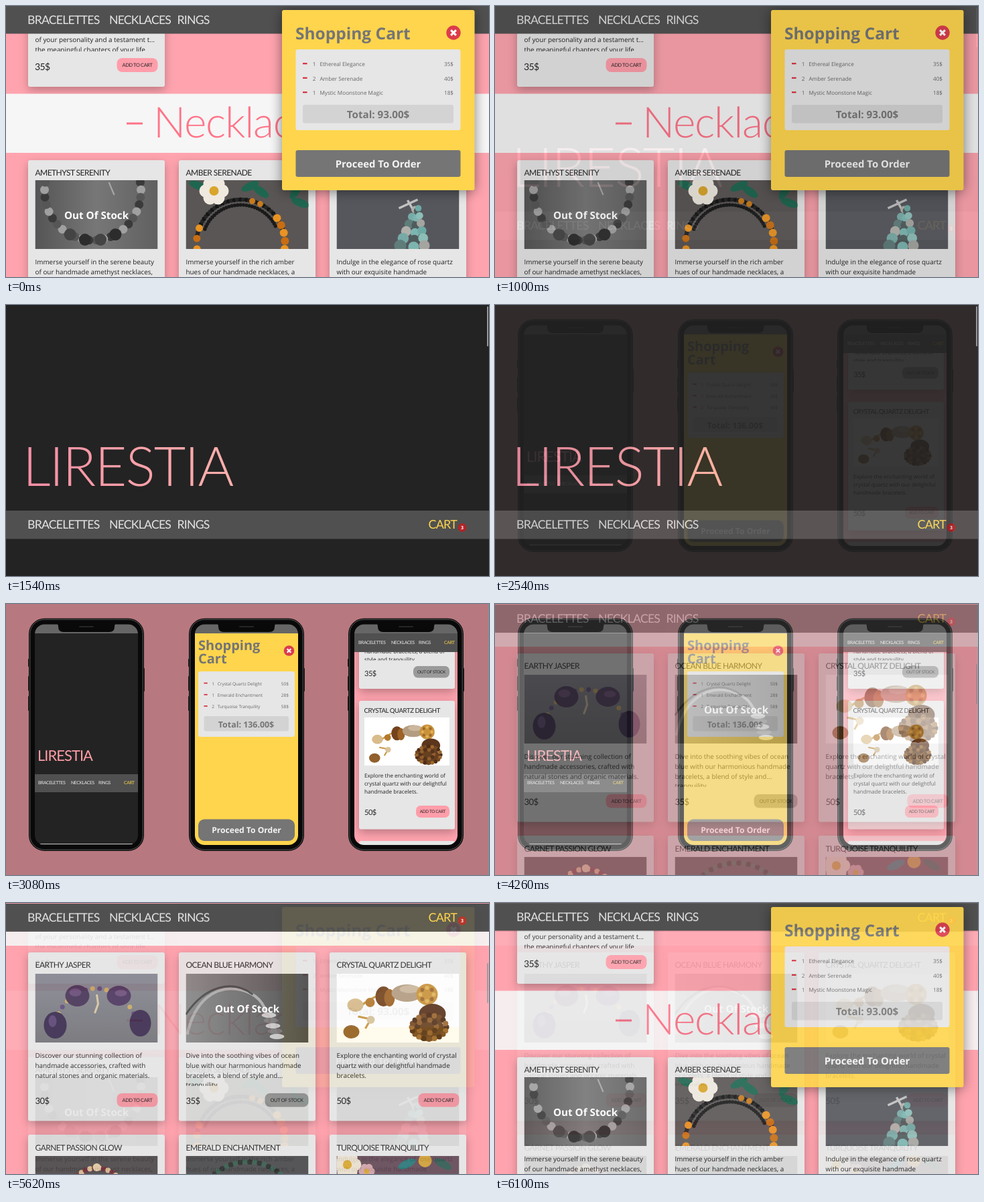
These frames come from a looping animation (721x406 px, 6.16 s). An HTML page:

```html
<!DOCTYPE html>
<html lang="en">
<head>
<meta charset="utf-8">
<title>Jewellery shop</title>
<style>
  html, body { margin: 0; width: 100%; height: 100%; overflow: hidden; }
  #stage { display: block; width: 100%; height: 100%; }
  text { font-family: "Open Sans", "Noto Sans", sans-serif; text-rendering: geometricPrecision; }
  .bold { font-weight: 700; }
  .display { font-family: Lato, sans-serif; letter-spacing: -.045em; }
  .large { font-weight: 300; letter-spacing: -.02em; }
  .card { filter: drop-shadow(0 5px 7px #0004); }
  .modal { filter: drop-shadow(0 2px 9px #0007); }

  .scene { animation: 6160ms steps(10) -4ms infinite; }
  #hero { animation-name: hero; }
  #phones { animation-name: phones; }
  #grid { animation-name: grid; }
  @keyframes hero {
    0%, 15.26% { opacity: 0 }
    25%, 80% { opacity: 1 }
    80.01%, 100% { opacity: 0 }
  }
  @keyframes phones {
    0%, 40.26% { opacity: 0 }
    50%, 80% { opacity: 1 }
    80.01%, 100% { opacity: 0 }
  }
  @keyframes grid {
    0%, 65.26% { opacity: 0 }
    75%, 90.26% { opacity: 1 }
    100% { opacity: 0 }
  }
</style>
</head>
<body>
<svg id="stage" viewBox="0 0 721 406" preserveAspectRatio="none">
  <defs>
    <linearGradient id="rose"><stop stop-color="#f78fa6"/><stop offset="1" stop-color="#ffb0ac"/></linearGradient>
    <linearGradient id="steel"><stop stop-color="#858585"/><stop offset=".55" stop-color="#636363"/><stop offset="1" stop-color="#454545"/></linearGradient>
    <linearGradient id="slate" x2="0" y2="1"><stop stop-color="#858591"/><stop offset="1" stop-color="#6f6f74"/></linearGradient>
    <linearGradient id="stone"><stop stop-color="#555"/><stop offset=".5" stop-color="#777"/><stop offset="1" stop-color="#606060"/></linearGradient>
  </defs>
  <g id="cart"></g>
  <g id="hero" class="scene"></g>
  <g id="phones" class="scene"></g>
  <g id="grid" class="scene"></g>
</svg>
<script>
const PINK = '#ffa4af', DARK = '#505050', GRAY = '#757575', PANEL = '#e6e6e6',
      YELLOW = '#fed54c', RED = '#dc3c4c', NIGHT = '#232323', INK = '#222';
const BRAND = 'LIRESTIA';

const rect = (x, y, w, h, fill, rx = 0, extra = '') =>
  `<rect x="${x}" y="${y}" width="${w}" height="${h}" rx="${rx}" fill="${fill}" ${extra}/>`;
const dot = (x, y, r, fill, ry = r) => `<ellipse cx="${x}" cy="${y}" rx="${r}" ry="${ry}" fill="${fill}"/>`;
const path = (d, stroke, width, fill = 'none') =>
  `<path d="${d}" stroke="${stroke}" stroke-width="${width}" fill="${fill}"/>`;
const text = (x, y, size, str, fill = INK, cls = '', anchor = 'start') =>
  `<text x="${x}" y="${y}" font-size="${size}" fill="${fill}" class="${cls}" text-anchor="${anchor}">${str}</text>`;
const display = (x, y, size, str, fill = INK, anchor) => text(x, y, size, str, fill, 'display', anchor);
const large = (x, y, size, str, fill) => text(x, y, size, str, fill, 'display large');
const bold = (x, y, size, str, fill = GRAY, anchor = 'middle') => text(x, y, size, str, fill, 'bold', anchor);
const lines = (x, y, size, gap, list) => list.map((s, i) => text(x, y + i * gap, size, s)).join('');
const crop = (x, y, w, h, content) =>
  `<svg x="${x}" y="${y}" width="${w}" height="${h}" viewBox="${x} ${y} ${w} ${h}">${content}</svg>`;

// Beads along an elliptic arc, angles in degrees, colours cycling
const beads = (cx, cy, rx, ry, from, to, n, r, colors) =>
  Array.from({ length: n }, (_, i) => {
    const a = (from + (to - from) * i / (n - 1)) * Math.PI / 180;
    return dot((cx + rx * Math.cos(a)).toFixed(1), (cy + ry * Math.sin(a)).toFixed(1), r, colors[i % colors.length]);
  }).join('');

// Beads along a straight line
const strand = (x0, y0, x1, y1, n, r, colors) =>
  Array.from({ length: n }, (_, i) => {
    const k = i / (n - 1);
    return dot(x0 + (x1 - x0) * k, y0 + (y1 - y0) * k, r * (.6 + .4 * k), colors[i % colors.length]);
  }).join('');

const flower = (x, y, r, petal) =>
  beads(x, y, r * .6, r * .6, 0, 300, 6, r * .5, [petal]) + dot(x, y, r * .35, '#d9a52c');
const leaf = (x, y, angle, fill = '#1f6650') =>
  `<g transform="translate(${x} ${y}) rotate(${angle})">${dot(0, 0, 14, fill, 6)}</g>`;

// Pictures live in a 183 x 103 box
const pictures = {
  amethyst: rect(0, 0, 183, 103, 'url(#stone)') +
    beads(86, 16, 72, 74, -10, 190, 24, 6.5, ['#3a3a3a', '#a0a0a0', '#565656']) +
    beads(86, 16, 72, 74, 62, 118, 4, 9, ['#2c2c2c', '#444']) + path('M110 3L118 22', '#aaa', 2),
  amber: rect(0, 0, 183, 103, '#5a5655') +
    leaf(18, 8, 20) + leaf(96, 9, -25) + leaf(112, 17, 35) + leaf(164, 16, -60) + leaf(171, 34, 20) +
    beads(82, 94, 66, 65, 190, 345, 40, 3.2, ['#151515', '#252525']) +
    beads(82, 92, 57, 55, 200, 335, 32, 2.7, ['#1a1a1a']) +
    beads(82, 94, 66, 65, 172, 200, 3, 5.5, ['#e89322', '#c76d12']) +
    beads(82, 94, 66, 65, 285, 296, 2, 4.5, ['#c87a1c']) +
    beads(82, 94, 66, 65, 325, 368, 5, 6, ['#e89322', '#c76d12']) + flower(42, 16, 20, '#efe9df'),
  quartz: rect(0, 0, 183, 103, '#56575d') +
    path('M93 42L121 29M106 30L114 44', '#c3c3c3', 3.5) +
    strand(117, 44, 95, 98, 6, 9, ['#b0b0aa', '#77aaa6', '#5f7d7a']) +
    strand(120, 46, 115, 100, 6, 8, ['#4f5c5c', '#7cb5b0']) +
    strand(122, 42, 131, 98, 6, 8, ['#6eaaa5', '#8cbdb7', '#a5a5a0']),
  jasper: rect(0, 0, 183, 103, 'url(#slate)') +
    beads(91, 95, 64, 73, 190, 350, 18, 3.5, ['#c8a661', '#5d4779']) +
    path('M92 31L94 45L89 59', '#d5c3a0', 3) +
    dot(63, 33, 18, '#453054', 16) + dot(125, 33, 18, '#49335b', 15) +
    dot(30, 77, 17, '#35264a', 20) + dot(157, 74, 16, '#38284c', 20) +
    dot(60, 28, 9, '#654874', 6) + dot(128, 29, 9, '#6a4b78', 5) + dot(26, 71, 6, '#594172', 9),
  ocean: rect(0, 0, 183, 103, 'url(#steel)') +
    path('M2 91C13 40 44 16 82 24Q116 32 122 66', '#aaa', 4) +
    path('M0 61C30 16 71 9 100 31', '#444', 3) +
    [62, 70, 78, 86, 94].map((y, i) => dot(124 + i * 3, y, 11, i % 2 ? '#777' : '#c7c7c7', 4)).join(''),
  crystal: rect(0, 0, 183, 103, '#fff') +
    path('M28 56Q45 38 65 32M32 64L51 68L43 82', '#c8953e', 3) +
    dot(28, 47, 12, '#d9bc8b', 10) + dot(50, 43, 7, '#b5792c') + dot(51, 69, 6, '#d9c39c') +
    dot(22, 87, 12, '#91602b', 10) + dot(70, 34, 12, '#74421c', 15) + dot(79, 36, 8, '#9d6225', 13) +
    dot(105, 29, 23, '#b49c80', 13) + dot(109, 23, 15, '#cbb79d', 6) + dot(135, 31, 16, '#c9923a') +
    beads(135, 31, 10, 10, 0, 315, 8, 3, ['#e0b45b', '#9c682b']) +
    dot(143, 60, 20, '#5c351d', 15) + dot(137, 83, 24, '#67401f', 18) +
    beads(138, 80, 26, 18, 0, 342, 20, 4, ['#4e2c16', '#9c6830', '#754821']) +
    beads(135, 79, 14, 10, 0, 324, 10, 4, ['#915e2c', '#54311b']),
  garnet: rect(0, 0, 183, 103, '#494346') + beads(92, 60, 42, 42, 190, 350, 18, 4, ['#6d2a35', '#d6b58c']) +
    dot(92, 17, 6, '#e1c7a0'),
  emerald: rect(0, 0, 183, 103, '#464648') + beads(92, 72, 70, 63, 190, 350, 28, 4, ['#252927', '#34594a']),
  turquoise: rect(0, 0, 183, 103, '#604653') + flower(16, 13, 19, '#eadfcd') + flower(45, 23, 11, '#d0a0a6') +
    leaf(105, 12, -25, '#247477') + leaf(159, 12, 30, '#2c5950') + dot(132, 7, 10, '#d09d34'),
};
const picture = (name, x, y, w = 183, h = 103) =>
  `<svg x="${x}" y="${y}" width="${w}" height="${h}" viewBox="0 0 183 103" preserveAspectRatio="none">${pictures[name]}</svg>`;

const card = (x, y, w, h) => rect(x, y, w, h, PANEL, 3, 'class="card"');
const button = (x, y, w, h, label, size = 7.4) =>
  rect(x, y, w, h, label === 'ADD TO CART' ? '#ff9eaa' : '#9a9a9a', h * .38) +
  display(x + w / 2, y + h / 2 + size * .36, size, label, INK, 'middle');
const soldOut = (x, y) => bold(x + 91.5, y, 15.2, 'Out Of Stock', '#fff');

const menu = y => ['BRACELETTES', 'NECKLACES', 'RINGS']
  .map((s, i) => display([32, 154, 255.5][i], y, 17.7, s, '#e4e4e4')).join('');
const cartLink = y => display(630.5, y, 18, 'CART', YELLOW) + dot(681, y - 1.5, 6.5, '#b02528') +
  bold(681, y + 1, 7, '3', '#fff');
const smallMenu = (x, y) => ['BRACELETTES', 'NECKLACES', 'RINGS', 'CART']
  .map((s, i) => display(x + [0, 49, 90, 128][i], y, 6.7, s, i === 3 ? YELLOW : '#eee')).join('');
const closeButton = (x, y, r) => {
  const d = r * .36;
  return dot(x, y, r, RED) + path(`M${x - d} ${y - d}l${2 * d} ${2 * d}m0 ${-2 * d}l${-2 * d} ${2 * d}`, '#fff', r * .28);
};
const orderRow = (x, right, y, size, [qty, name, price]) =>
  rect(x, y - size * .58, size * .8, size * .25, '#d8202f') +
  text(x + size * 1.8, y, size, qty, '#666') +
  text(x + size * 3.1, y, size, name, '#666') +
  text(right, y, size, price, '#666', '', 'end');
const scrollThumb = (y, fill) => rect(718, y, 2, 60, fill, 1);

const columns = [33, 258, 483];

function cartScene() {
  const items = [
    ['AMETHYST SERENITY', 'amethyst', ['Immerse yourself in the serene beauty', 'of our handmade amethyst necklaces,']],
    ['AMBER SERENADE', 'amber', ['Immerse yourself in the rich amber', 'hues of our handmade necklaces, a']],
    ['ROSE QUARTZ', 'quartz', ['Indulge in the elegance of rose quartz', 'with our exquisite handmade']],
  ];
  const orders = [['1', 'Ethereal Elegance', '35$'], ['2', 'Amber Serenade', '40$'], ['1', 'Mystic Moonstone Magic', '18$']];
  return rect(0, 0, 721, 406, PINK) +
    card(33, -100, 204, 221) +
    crop(33, 40, 204, 28, lines(43.5, 54, 9.9, 15, ['of your personality and a testament t...', 'the meaningful chapters of your life'])) +
    display(43, 95.5, 14, '35$') + button(165.5, 78, 61, 21, 'ADD TO CART') +
    rect(0, 131.5, 721, 88.5, '#f6f6f6') +
    rect(180, 174.5, 24, 3, '#ff7488') + large(220, 197, 64, 'Necklaces', '#ff7488') +
    items.map(([title, pic, copy], i) => {
      const x = columns[i];
      return card(x, 231, 204, 200) + display(x + 10.5, 254, 12, title) + picture(pic, x + 10.5, 261) +
        lines(x + 10.5, 387, 9.9, 15, copy);
    }).join('') + soldOut(43.5, 319) +
    rect(0, 0, 721, 41.5, DARK) + menu(26.5) +
    rect(412, 6, 287.5, 270, YELLOW, 3, 'class="modal"') +
    bold(432, 50, 24.5, 'Shopping Cart', GRAY, 'start') + closeButton(668, 40, 10.7) +
    rect(432.5, 65, 246, 121, PANEL, 3) +
    orders.map((o, i) => orderRow(443, 668, 90 + i * 21.5, 8.2, o)).join('') +
    rect(443, 148, 225, 27.5, '#d3d3d3', 3) + bold(555.5, 168, 15.2, 'Total: 93.00$') +
    rect(432.5, 216, 246, 40, GRAY, 3) + bold(555.5, 242, 14.9, 'Proceed To Order', '#f4f4f4');
}

function heroScene() {
  return rect(0, 0, 721, 406, NIGHT) +
    large(25, 271, 82, BRAND, 'url(#rose)') +
    rect(0, 308, 721, 42.5, DARK) + menu(335) + cartLink(335) + scrollThumb(2, '#9a9a9a');
}

function phone(x, content) {
  const side = (dx, y, h) => rect(x + dx, y, 2, h, '#222', 1);
  return side(-1, 82, 12) + side(-1, 108, 22) + side(-1, 138, 22) + side(171, 96, 35) +
    rect(x + 7, 28, 158, 335, '#666') + content +
    rect(x + 4.5, 26, 163, 339.5, 'none', 19, 'stroke="#090909" stroke-width="9"') +
    rect(x + 1.8, 23.2, 168.4, 345, 'none', 21.5, 'stroke="#626262" stroke-width=".9"') +
    path(`M${x + 40} 29h92q-4 0-4 5q0 8-8 8h-68q-8 0-8-8q0-5-4-5z`, 'none', 0, '#090909') +
    rect(x + 75, 33, 22, 2, '#252525', 1);
}

function phonesScene() {
  const orders = [['1', 'Crystal Quartz Delight', '50$'], ['1', 'Emerald Enchantment', '28$'], ['2', 'Turquoise Tranquility', '58$']];
  const home = rect(42, 44, 156, 318, NIGHT) +
    display(47, 234.5, 22, BRAND, '#ff9da6') +
    rect(42, 255, 156, 27, DARK) + smallMenu(48, 270) + rect(48, 359, 144, 1, '#bbb');
  const order = rect(281, 44, 156, 318, YELLOW) +
    bold(287, 69, 20, 'Shopping', GRAY, 'start') + bold(287, 89, 20, 'Cart', GRAY, 'start') +
    closeButton(422.5, 70, 7.8) + rect(287, 101, 144, 98, PANEL, 3) +
    orders.map((o, i) => orderRow(295.5, 422, 121.5 + i * 17.2, 6.5, o)).join('') +
    rect(295.5, 168, 126.5, 22.5, '#d3d3d3', 3) + bold(358.5, 185, 12.4, 'Total: 136.00$') +
    rect(287, 322.5, 144, 32.5, GRAY, 9) + bold(359, 343, 12.1, 'Proceed To Order', '#f4f4f4');
  const shop = rect(519, 44, 156, 318, PINK) +
    card(527, 60, 143, 67) +
    crop(527, 70, 143, 14.5, lines(535, 74, 8.15, 12, ['handmade bracelets, a blend of', 'style and tranquility'])) +
    display(535, 107.5, 11, '35$') + button(608, 93, 54, 17.5, 'OUT OF STOCK', 6.3) +
    card(527, 145, 143, 192.5) + display(534.5, 163, 9.6, 'CRYSTAL QUARTZ DELIGHT') +
    picture('crystal', 535, 170, 127, 72) +
    lines(535, 260, 8.15, 12, ['Explore the enchanting world of', 'crystal quartz with our delightful', 'handmade bracelets.']) +
    display(535, 316, 11, '50$') + button(612, 302, 50, 18, 'ADD TO CART', 6.3) +
    rect(527, 355, 143, 8, PANEL, 3) +
    rect(519, 44, 156, 28, DARK) + smallMenu(526, 60);
  return rect(0, 0, 721, 406, '#b8787f') + rect(720, 0, 1, 406, '#6f9ba5') +
    phone(34, home) + phone(273, order) + phone(511, shop);
}

function gridScene() {
  const items = [
    ['EARTHY JASPER', 'jasper', '30$', 'ADD TO CART',
      ['Discover our stunning collection of', 'handmade accessories, crafted with', 'natural stones and organic materials.']],
    ['OCEAN BLUE HARMONY', 'ocean', '35$', 'OUT OF STOCK',
      ['Dive into the soothing vibes of ocean', 'blue with our harmonious handmade', 'bracelets, a blend of style and...', 'tranquility']],
    ['CRYSTAL QUARTZ DELIGHT', 'crystal', '50$', 'ADD TO CART',
      ['Explore the enchanting world of crystal', 'quartz with our delightful handmade', 'bracelets.']],
  ];
  const nextRow = [['GARNET PASSION GLOW', 'garnet'], ['EMERALD ENCHANTMENT', 'emerald'], ['TURQUOISE TRANQUILITY', 'turquoise']];
  return rect(0, 0, 721, 406, PINK) + rect(0, 1, 721, 63, '#f6f6f6') +
    items.map(([title, pic, price, label, copy], i) => {
      const x = columns[i], w = label === 'ADD TO CART' ? 61 : 65;
      return card(x, 74, 204, 252.5) + display(x + 10.5, 97, 12, title) + picture(pic, x + 10.5, 106) +
        crop(x, 215, 204, 59, lines(x + 10.5, 232, 9.9, 14.8, copy)) +
        display(x + 10.5, 301, 13, price) + button(x + 193.5 - w, 285, w, 20.5, label);
    }).join('') + soldOut(268.5, 164) +
    nextRow.map(([title, pic], i) =>
      card(columns[i], 347, 204, 100) + display(columns[i] + 10.5, 371, 12, title) +
      picture(pic, columns[i] + 10.5, 379)).join('') +
    rect(0, 1, 721, 42, DARK) + menu(28) + cartLink(28) + scrollThumb(90, '#999');
}

const scenes = { cart: cartScene, hero: heroScene, phones: phonesScene, grid: gridScene };
for (const [id, draw] of Object.entries(scenes)) document.getElementById(id).innerHTML = draw();
</script>
</body>
</html>
```
